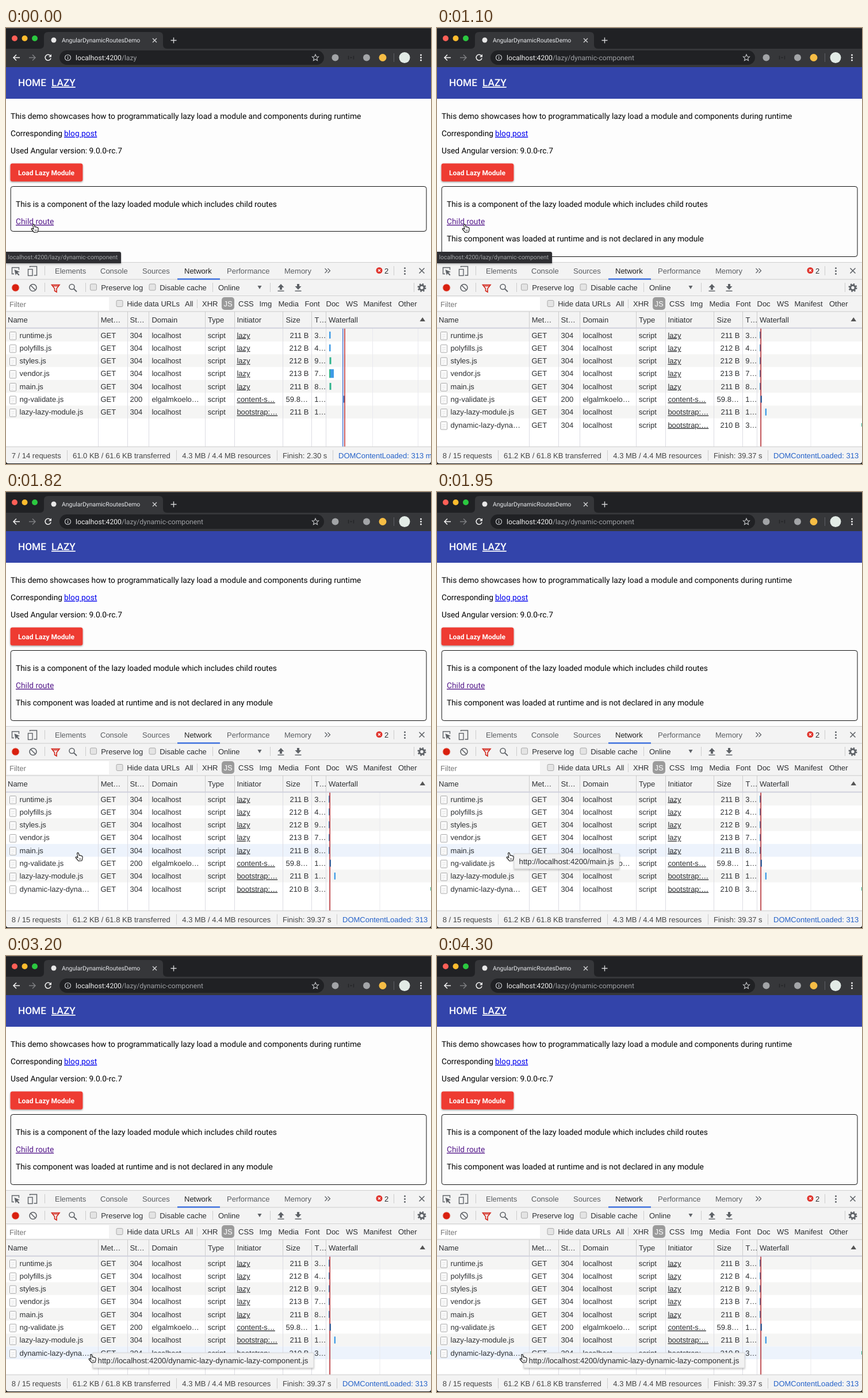
Recreate the animation shown at these times as an HTML page. Size 739 by 758 pixels, loop 4.33 s.

```html
<!DOCTYPE html>
<html lang="en">
<head>
<meta charset="utf-8">
<title>Lazy routes demo</title>
<style>
  html, body { margin: 0; width: 100%; height: 100%; overflow: hidden; background: #fdfdfd; }
  svg { display: block; width: 739px; height: 758px; }
  text { white-space: pre; text-rendering: geometricPrecision; }
  .page { font: 13.77px Roboto, sans-serif; }
  .chrome { font: 10.44px Roboto, sans-serif; }
  .tools { font: 13px "Liberation Sans", Arial, sans-serif; fill: #2d2f32; }
  .link { text-decoration: underline; }
</style>
</head>
<body>
<svg id="stage" viewBox="0 0 739 758" xmlns="http://www.w3.org/2000/svg"></svg>
<script>
const LOOP = 4330;
const NAVIGATE = 300, LOADED = 900;
const ROW_TOP = 522.7, ROW_H = 22.3;
const COLUMNS = [160, 211, 248, 346, 397, 481, 531, 556];

const text = (x, y, s, attrs = '') => `<text x="${x}" y="${y}" ${attrs}>${s}</text>`;
const rect = (x, y, w, h, fill, attrs = '') =>
  `<rect x="${x}" y="${y}" width="${w}" height="${h}" fill="${fill}" ${attrs}/>`;
const circle = (x, y, r, fill, attrs = '') => `<circle cx="${x}" cy="${y}" r="${r}" fill="${fill}" ${attrs}/>`;
const stroke = (d, color, width = 1.4, attrs = '') =>
  `<path d="${d}" fill="none" stroke="${color}" stroke-width="${width}" ${attrs}/>`;
const shape = (d, fill) => `<path d="${d}" fill="${fill}"/>`;
const dots = (x, y, gap, color) => [-gap, 0, gap].map(d => circle(x, y + d, 1.5, color)).join('');
const group = (id, body, attrs = '') => `<g id="${id}" ${attrs}>${body}</g>`;
const labels = (y, list) => list.map(([x, s]) => text(x, y, s)).join('');
const dividers = (list, y, h) => list.map(x => rect(x, y, 1, h, '#ccc')).join('');

function browserBar() {
  const white = '#f1f1f1', gray = '#c4c6c9';
  return rect(0, 0, 739, 68, '#202124') + rect(0, 0, 739, 1, '#45464a') +
    circle(15, 18, 5, '#fe5f57') + circle(32.5, 18, 5, '#febc2e') + circle(50, 18, 5, '#2bc840') +
    shape('M59 36Q66 36 66 29V14Q66 7 73 7H266Q273 7 273 14V29Q273 36 280 36Z', '#36373a') +
    rect(0, 36, 739, 32, '#36373a') +
    circle(83, 21, 4.5, '#e8e8e8') +
    text(97, 25, 'AngularDynamicRoutesDemo', 'fill="#e8eaed"') +
    stroke('M255 18l7 7m0-7l-7 7', '#d4d5d7', 1.3) +
    stroke('M286.500 21.500h10m-5-5v10', '#d4d5d7', 1.4) +
    stroke('M24 51.500H13m5-5l-5 5 5 5', white, 1.6) +
    stroke('M40 51.500h11m-5-5l5 5-5 5', '#7d7e81', 1.5) +
    stroke('M77.300 48.500A5 5 0 1 0 78 52.500', white, 1.6) + shape('M79 45.500v5h-5z', white) +
    rect(93, 39, 460, 25, '#202124', 'rx="12.500"') +
    circle(107.5, 51.5, 5, 'none', `stroke="${gray}" stroke-width="1.200"`) +
    rect(106.9, 50.5, 1.3, 4, gray) + rect(106.9, 48.3, 1.3, 1.3, gray) +
    `<text x="121" y="56" font-size="12.150" fill="#f1f1f1">localhost:4200<tspan id="path" fill="#9fa1a5"></tspan></text>` +
    stroke('M538 46l1.600 3.700 4 .3-3 2.700.9 3.900-3.500-2.100-3.500 2.100.9-3.900-3-2.700 4-.3z', gray, 1.1) +
    circle(572.5, 51.5, 6, '#a2a4a7') + stroke('M595.500 48.500v6m9-6v6m-6-3h3', '#222326', 1.3) +
    circle(627, 51.5, 6, '#a3a5a8') + circle(655, 51.5, 6.5, '#f6bd45') +
    rect(674, 44, 1, 15, '#5f6064') + circle(693, 51.5, 9.5, '#e2ebe6') + dots(721.5, 51.5, 4.5, white);
}

function page() {
  return rect(0, 68, 739, 340, '#fdfdfd') + rect(0, 68, 739, 55, '#3344aa') +
    `<g fill="#fff" font-size="17.200" font-weight="500">${text(21, 101, 'HOME')}${text(79, 101, 'LAZY', 'class="link"')}</g>` +
    text(8, 158, 'This demo showcases how to programmatically lazy load a module and components during runtime') +
    text(8, 188, 'Corresponding ') + text(101, 188, 'blog post', 'class="link" fill="#0000ee"') +
    text(8, 218, 'Used Angular version: 9.0.0-rc.7') +
    rect(7.6, 235.6, 125.8, 31.2, '#ee3a30', 'rx="3.500" filter="url(#raised)"') +
    text(21, 255.5, 'Load Lazy Module', 'fill="#fff" font-size="12" font-weight="700"') +
    rect(8.2, 275.5, 722.8, 78, 'none', 'id="outlet" rx="4" stroke="#111"') +
    text(17, 311, 'This is a component of the lazy loaded module which includes child routes') +
    text(17, 341, 'Child route', 'class="link" fill="#551a8b"') +
    text(17, 371, 'This component was loaded at runtime and is not declared in any module', 'id="childText"');
}

function toolbars() {
  const icon = '#5f6368';
  const box = (x, y) => rect(x - 5.5, y - 5.5, 11, 11, '#e4e4e4', 'rx="2" stroke="#a9a9a9"');
  return rect(0, 408, 739, 350, '#fff') + rect(0, 408, 739, 114, '#f3f3f3') +
    rect(0, 407, 739, 1, '#cfcfcf') + rect(0, 436.5, 739, 1, '#ccc') + rect(0, 465, 739, 1, '#d2d2d2') +
    stroke('M14 427.500h-3.500v-11h12v4', icon, 1.4) + shape('M14.500 420l9.500 4-4 1.300 3.500 3.700-1.500 1.400-3.500-3.700-1.700 3.300z', icon) +
    stroke('M41.500 416v-1.500h12v15.500h-5', icon, 1.5) + rect(38.5, 419.5, 7.5, 11, '#f3f3f3', `stroke="${icon}" stroke-width="1.400"`) +
    `<g fill="#5a5d61">${labels(426.5, [[85, 'Elements'], [164, 'Console'], [237, 'Sources'], [384, 'Performance'], [484, 'Memory']])}</g>` +
    text(310, 426.5, 'Network', 'fill="#222"') + rect(298, 435.3, 74, 2.4, '#3b6fe0') +
    stroke('M554.500 418l4 4-4 4m5-8l4 4-4 4', icon, 1.3) +
    circle(649, 421.5, 5.5, '#e0332c') + stroke('M647 419.500l4 4m0-4l-4 4', '#fff', 1.2) + text(658, 426.5, '2') +
    dividers([67, 674], 414, 16) + dots(693.5, 422.5, 5, icon) + stroke('M718.500 417.500l9 9m0-9l-9 9', icon, 1.6) +

    circle(16.5, 451.5, 6.5, '#d9200f', 'stroke="#efb0a8"') +
    circle(47, 451.5, 6, 'none', `stroke="${icon}" stroke-width="1.600"`) + stroke('M43 447.500l8 8', icon, 1.6) +
    stroke('M79.500 446.500h13.500l-5 6.500v6l-3.500-2v-4z', '#d3271c', 1.6) + stroke('M82 448.500h9', '#d3271c', 1.5) +
    circle(114.5, 450, 4.5, 'none', `stroke="${icon}" stroke-width="1.600"`) + stroke('M118 453.500l5 5', icon, 1.8) +
    dividers([67, 138, 359, 459, 709], 443, 16) + box(152, 450.5) + box(254.5, 450.5) +
    labels(455.5, [[165.2, 'Preserve log'], [267.2, 'Disable cache'], [369, 'Online']]) +
    shape('M437.500 448h7l-3.500 6z', icon) +
    shape('M478 445l5.500 6h-3.500v4h-4v-4h-3.500z M472.500 456.500h11v1.500h-11z', icon) +
    shape('M508 455l5.500-6h-3.500v-4h-4v4h-3.500z M502.500 456.500h11v1.500h-11z', icon) +
    circle(723, 451.5, 4.2, 'none', `stroke="${icon}" stroke-width="3"`) +
    circle(723, 451.5, 6.3, 'none', `stroke="${icon}" stroke-width="2.400" stroke-dasharray="2.474"`) +

    rect(2, 468, 177, 23, '#fff') + text(6, 485, 'Filter', 'fill="#777"') + box(197.5, 479) +
    rect(375, 468, 22, 22, '#9b9b9b', 'rx="5"') + text(378.5, 484, 'JS', 'fill="#fff"') + dividers([332], 472, 15) +
    labels(484, [[210.2, 'Hide data URLs'], [311, 'All'], [341, 'XHR'], [404, 'CSS'], [440.5, 'Img'], [473.5, 'Media'],
      [519.5, 'Font'], [556.5, 'Doc'], [591, 'WS'], [621.5, 'Manifest'], [682, 'Other']]) +

    rect(0, 492.5, 739, 1, '#ccc') +
    labels(511.5, [[3, 'Name'], [164.7, 'Met…'], [215.5, 'St…'], [253.4, 'Domain'], [351, 'Type'], [401.4, 'Initiator'],
      [486.5, 'Size'], [536.5, 'T…'], [561, 'Waterfall']]) +
    shape('M719.500 510h9.500l-4.700-7z', '#555');
}

function requestRow(row, i) {
  const [name, status, domain, initiator, size, time] = row;
  const y = ROW_TOP + i * ROW_H, base = y + 15.8;
  const sizeText = size.endsWith('…') ? text(486.6, base, size) : text(526.5, base, size, 'text-anchor="end"');
  const idle = i % 2 ? '#fff' : '#f5f5f4';
  const body = rect(0, y, 739, ROW_H, idle, `class="stripe" data-idle="${idle}"`) +
    rect(6.5, y + 5.8, 11, 13.5, '#fff', 'rx="1" stroke="#a5a5a5"') +
    stroke(`M9 ${y + 10.5}h6m-6 3h6m-6 3h4`, '#dcdcdc', 1) +
    text(23.6, base, name) + text(164.5, base, 'GET') + text(215.5, base, status, 'class="status"') +
    text(253.4, base, domain) + text(350.7, base, 'script') + text(401.4, base, initiator, 'class="link"') +
    `<g class="size">${sizeText}</g>` + text(536.2, base, time, 'class="time"');
  return group('row' + i, body);
}

function bar(row, x, w, color, h = 12) {
  return rect(x, ROW_TOP + (row + .5) * ROW_H - h / 2, w, h, color);
}

function waterfalls() {
  const blue = '#3f9be6', teal = '#2fb38c', grid = '#e9e9ee', h = 206;
  const wide = [638, 717].map(x => rect(x - 1, 522, 1, h, grid)).join('') +
    bar(0, 562, 2.5, blue) + bar(1, 562, 2.5, blue) + bar(2, 562.5, 3, teal) +
    bar(3, 562, 2.5, teal, 15) + bar(3, 564, 6, blue, 15) + bar(4, 562.5, 3, teal) + bar(5, 586.5, 3, '#3b78b8') +
    rect(585, 522, 1.5, h, '#4a78d4') + rect(588.2, 522, 1.6, h, '#c0393b');
  let narrow = rect(0, 522, 1, h, grid, 'id="gridLine"');
  for (let i = 0; i < 5; i++) narrow += bar(i, 561, 2, '#4a8fc4');
  narrow += rect(562.3, 522, 1.7, h, '#b8393f') + bar(5, 562.5, 2.5, '#35639c') + bar(6, 570.7, 2.3, blue);
  return group('wideFall', wide) + group('narrowFall', narrow) + group('newBar', bar(7, 738, 1, teal, 6));
}

function footer() {
  const color = 'fill="#444"';
  return rect(0, 728, 739, 29, '#f3f3f3') + rect(0, 727.5, 739, 1, '#ccc') + dividers([106, 296, 471], 734, 18) +
    rect(0, 734, 1, 18, '#ccc', 'id="lastDivider"') +
    text(9.7, 748, '', `id="requests" ${color}`) + text(116, 748, '', `id="transferred" ${color}`) +
    text(306.3, 748, '4.3 MB / 4.4 MB resources', color) + text(481, 748, '', `id="finish" ${color}`) +
    text(0, 748, '', 'id="domLoaded" fill="#2562c9"') + shape('M0 753Q0 757 4 757H735Q739 757 739 753V758H0Z', '#111');
}

const rows = [
  ['runtime.js', '304', 'localhost', 'lazy', '211 B', '3…'],
  ['polyfills.js', '304', 'localhost', 'lazy', '212 B', '4…'],
  ['styles.js', '304', 'localhost', 'lazy', '212 B', '9…'],
  ['vendor.js', '304', 'localhost', 'lazy', '213 B', '7…'],
  ['main.js', '304', 'localhost', 'lazy', '211 B', '8…'],
  ['ng-validate.js', '200', 'elgalmkoelo…', 'content-s…', '59.8…', '1…'],
  ['lazy-lazy-module.js', '304', 'localhost', 'bootstrap:…', '211 B', '1…'],
  ['dynamic-lazy-dyna…', '304', 'localhost', 'bootstrap:…', '210 B', '3…']
];

const tooltip = (id, x, y, w, s) => group(id,
  rect(x, y, w, 26, '#f2f2f2', 'stroke="#cfcfcf" stroke-width=".8" filter="url(#soft)"') +
  text(x + 8.5, y + 17.5, s, 'font-size="13.300" fill="#2d2f32"'));

const hand = '<path d="M-1.400 1Q0-.8 1.200 1L2.200 5Q3.300 4 4.300 5.200Q5.600 4.600 6.300 5.900Q7.900 5.500 8.200 7.500L7.800 10.800L6.800 14L1 14.500Q-.8 12-3.600 9Q-4.200 7-2.300 7.300L-.1 8.900Z" fill="#fff" stroke="#111" stroke-width="1.100" stroke-linejoin="round"/>' +
  stroke('M2.600 9.500v3m2-3v3', '#222', .8);
const beam = ['#fff', '#222'].map((c, i) =>
  stroke('M-3-6Q0-6 0-4Q0-6 3-6M0-4.500V4.500M-3 6Q0 6 0 4Q0 6 3 6M-1.500 2.500h3', c, i ? 1.2 : 2.8)).join('');
const arrow = '<path d="M0 0V12L2.800 9.300L4.700 13.500L6.500 12.700L4.700 8.600H8.500Z" fill="#111" stroke="#fff"/>';

const shadow = (id, dy, blur, opacity) =>
  `<filter id="${id}" x="-10%" y="-40%" width="120%" height="200%"><feDropShadow dx="0" dy="${dy}" stdDeviation="${blur}" flood-opacity="${opacity}"/></filter>`;

const stage = document.getElementById('stage');
stage.innerHTML =
  `<defs>${shadow('soft', 1.5, 1.5, .3)}${shadow('raised', 1.2, 1.8, .42)}</defs>` +
  `<g class="page">${page()}</g><g class="chrome">${browserBar()}</g>` +
  `<g class="tools">${toolbars()}${rows.map(requestRow).join('')}${waterfalls()}` +
  COLUMNS.map(x => rect(x, 493, 1, 28, '#ccc') + rect(x, 521, 1, 207, '#dcdce3')).join('') +
  rect(0, 520.7, 739, 2, '#cfd0dc') + footer() + '</g>' +
  group('bubble', shape('M0 389H197Q200 389 200 392V409H0Z', '#2d2e31') +
    text(3.5, 402.3, 'localhost:4200/lazy/dynamic-component', 'font-size="10.450" fill="#a5a7aa"'), 'class="chrome" filter="url(#soft)"') +
  `<g class="tools">${tooltip('mainTip', 134, 629, 183, 'http://localhost:4200/main.js')}` +
  tooltip('lazyTip', 151, 690, 384, 'http://localhost:4200/dynamic-lazy-dynamic-lazy-component.js') + '</g>' +
  group('cursor', group('hand', hand) + group('beam', beam) + group('arrow', arrow));

const el = id => document.getElementById(id);
const show = (id, on) => el(id).setAttribute('display', on ? 'inline' : 'none');
const setText = (node, s) => { if (node.textContent !== s) node.textContent = s; };
const stripes = [...document.querySelectorAll('.stripe')];
const newRow = { status: document.querySelector('#row7 .status'), size: document.querySelector('#row7 .size text'),
  time: document.querySelector('#row7 .time') };

// [time, x, y] of the pointer's hot spot
const pointerPath = [[0, 48, 341], [1200, 48, 341], [1420, 46, 373], [1540, 46, 373], [1820, 125, 627],
  [2040, 125, 627], [2240, 143, 686], [2400, 143, 686], [2650, 148, 692.5], [LOOP, 148, 692.5]];

function pointerAt(t) {
  const i = pointerPath.findIndex((p, k) => k && t <= p[0]);
  const [t0, x0, y0] = pointerPath[i - 1], [t1, x1, y1] = pointerPath[i];
  const u = (t - t0) / (t1 - t0), e = u * u * (3 - 2 * u);
  return [x0 + (x1 - x0) * e, y0 + (y1 - y0) * e];
}

function render(t) {
  const navigated = t >= NAVIGATE, loaded = t >= LOADED;
  setText(el('path'), navigated ? '/lazy/dynamic-component' : '/lazy');
  el('outlet').setAttribute('height', loaded ? 122 : 78);
  show('childText', loaded);
  show('bubble', t < 1600);

  show('row7', navigated);
  setText(newRow.status, loaded ? '304' : '(p…');
  setText(newRow.size, loaded ? '210 B' : '0 B');
  setText(newRow.time, loaded ? '3…' : 'P…');
  for (const key of ['status', 'time']) newRow[key].setAttribute('fill', loaded ? '#2d2f32' : '#888');
  show('wideFall', !navigated);
  show('narrowFall', navigated);
  show('newBar', loaded);
  el('gridLine').setAttribute('x', loaded ? 649.5 : 651);

  setText(el('requests'), navigated ? '8 / 15 requests' : '7 / 14 requests');
  setText(el('transferred'), loaded ? '61.2 KB / 61.8 KB transferred' : '61.0 KB / 61.6 KB transferred');
  setText(el('finish'), loaded ? 'Finish: 39.37 s' : 'Finish: 2.30 s');
  setText(el('domLoaded'), loaded ? 'DOMContentLoaded: 313' : 'DOMContentLoaded: 313 ms');
  el('domLoaded').setAttribute('x', loaded ? 585 : 578);
  el('lastDivider').setAttribute('x', loaded ? 575 : 568);

  const [x, y] = pointerAt(t);
  const hovered = Math.floor((y - ROW_TOP) / ROW_H);
  stripes.forEach((s, i) => s.setAttribute('fill', i === hovered ? '#edf3fc' : s.dataset.idle));
  const isHand = y < 346 || hovered >= 0, isBeam = !isHand && y > 356 && y < 380;
  show('hand', isHand);
  show('beam', isBeam);
  show('arrow', !isHand && !isBeam);
  el('cursor').setAttribute('transform', `translate(${x.toFixed(2)} ${y.toFixed(2)})`);
  show('mainTip', t >= 1890 && t < 2090);
  show('lazyTip', t >= 2290);
}

const start = performance.now();
function tick() {
  render((performance.now() - start) % LOOP);
  requestAnimationFrame(tick);
}
tick();
</script>
</body>
</html>
```
